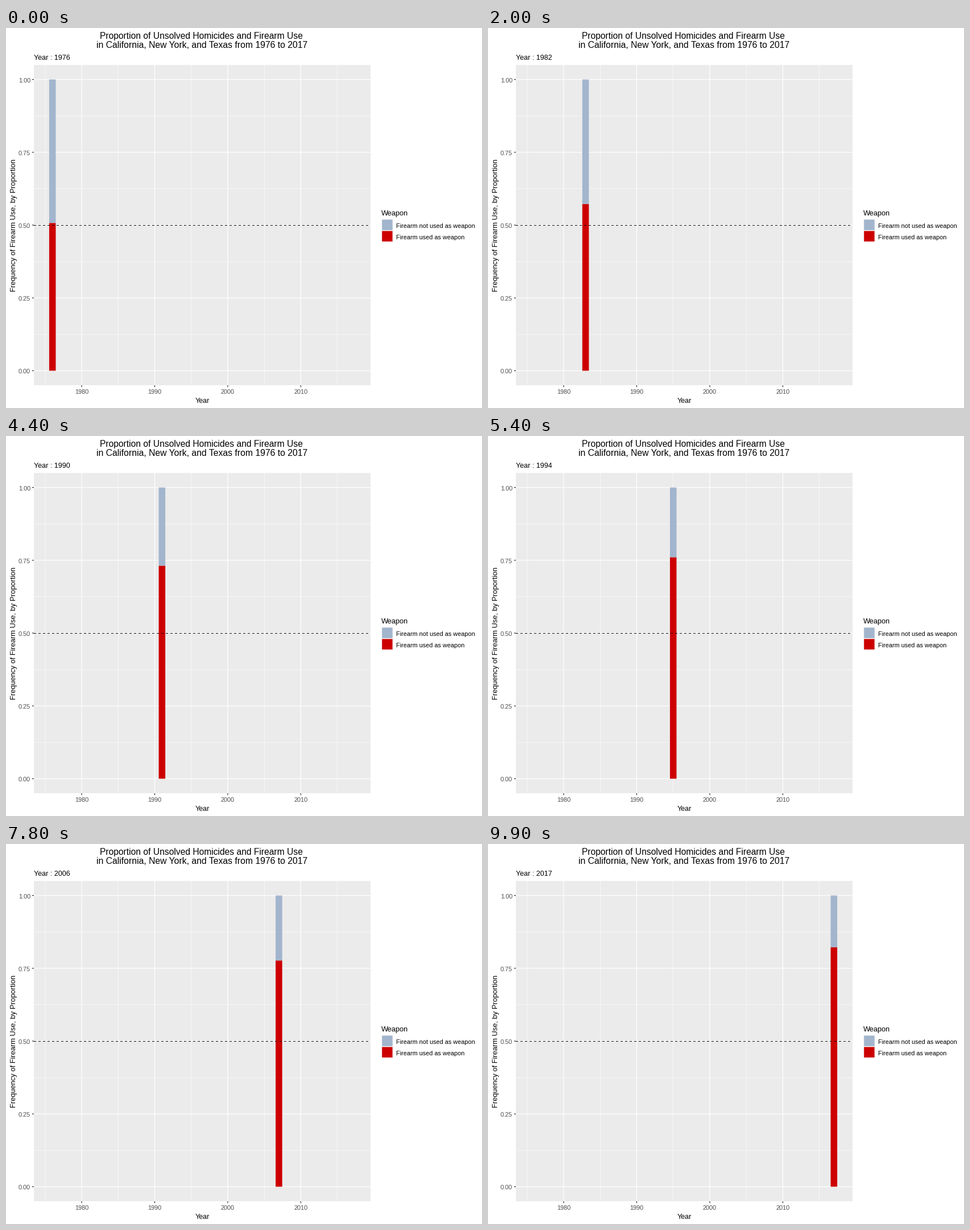
A matplotlib script that plays this animation: 837x669 px, repeating every 10000 ms.

```python
import matplotlib.pyplot as plt
import numpy as np
from matplotlib.animation import FuncAnimation
from matplotlib.patches import Rectangle

W, H, DPI = 837, 669, 64
FRAMES, INTERVAL = 100, 100
FIRST, LAST = 1976, 2017

# Panel edges and data scales in pixels
LEFT, RIGHT, TOP, BOTTOM = 49, 641, 65, 629
YEAR_W = (RIGHT - LEFT) / 46.09
BAR_W = 0.9 * YEAR_W
UNIT_H = (BOTTOM - TOP) / 1.1
ZERO_Y = BOTTOM - 0.05 * UNIT_H
MAJOR, MINOR = 1.23, 0.62  # grid line widths
KEY_SIZE, KEY_INSET = 20, 0.8

BLUE, RED = "#A2B5CD", "#CD0000"
PANEL, KEY, TICK, TICK_TEXT = "#EBEBEB", "#F2F2F2", "#333333", "#4D4D4D"

KNOWN_YEARS = [1976, 1983, 1991, 1995, 2002, 2011, 2017]
KNOWN_SHARES = [0.507, 0.572, 0.731, 0.760, 0.7595, 0.790, 0.822]

plt.rcParams["font.family"] = "Liberation Sans"
fig = plt.figure(figsize=(W / DPI, H / DPI), dpi=DPI, facecolor="white")
ax = fig.add_axes([0, 0, 1, 1])
ax.set_xlim(0, W)
ax.set_ylim(H, 0)
ax.axis("off")


def x_of(year):
    return LEFT + (year - 1975.55 + 2.095) * YEAR_W


def y_of(share):
    return ZERO_Y - share * UNIT_H


def rect(x, y, w, h, color, z=1):
    return ax.add_patch(Rectangle((x, y), w, h, facecolor=color, linewidth=0,
                                  snap=False, zorder=z))


def text(x, y, s, px, color="black", ha="left", **kw):
    return ax.text(x, y, s, fontsize=px * 72 / DPI, color=color, ha=ha,
                   va="baseline", zorder=6, **kw)


def draw_panel():
    rect(LEFT, TOP, RIGHT - LEFT, BOTTOM - TOP, PANEL)
    for i in range(9):
        y = y_of(i / 8)
        width = MINOR if i % 2 else MAJOR
        rect(LEFT, y - width / 2, RIGHT - LEFT, width, "white", 2)
        if i % 2 == 0:
            rect(LEFT - 3.2, y - width / 2, 3.2, width, TICK, 2)
            text(43, round(y) + 5, f"{i / 8:.2f}", 10.9, TICK_TEXT, "right")
    for year in range(1975, 2016, 5):
        x = x_of(year)
        width = MINOR if year % 10 else MAJOR
        rect(x - width / 2, TOP, width, BOTTOM - TOP, "white", 2)
        if year % 10 == 0:
            rect(x - width / 2, BOTTOM, width, 3.2, TICK, 2)
            text(x, 644, str(year), 10.9, TICK_TEXT, "center")
    for x in range(LEFT, RIGHT, 8):
        rect(x, round(y_of(0.5)), 4, 1, "black", 5)


def draw_labels():
    text(343, 19, "Proportion of Unsolved Homicides and Firearm Use", 15.6,
         ha="center")
    text(345, 35, "in California, New York, and Texas from 1976 to 2017", 15.7,
         ha="center")
    text(345, 660, "Year", 12.5, ha="center")
    text(17, 347, "Frequency of Firearm Use, by Proportion", 12.85,
         ha="center", rotation=90, rotation_mode="anchor")


def draw_legend():
    text(660, 330, "Weapon", 12.8)
    entries = [("Firearm not used as weapon", BLUE),
               ("Firearm used as weapon", RED)]
    for i, (label, color) in enumerate(entries):
        x, y = 660.4, 336.6 + i * KEY_SIZE
        inner = KEY_SIZE - 2 * KEY_INSET
        rect(x, y, KEY_SIZE, KEY_SIZE, KEY)
        rect(x + KEY_INSET, y + KEY_INSET, inner, inner, color, 2)
        text(686, 352 + i * KEY_SIZE, label, 10.9)


def year_at(frame):
    """Year reached: one step per three frames at first, then per two."""
    if frame < 50:
        return FIRST + min((frame + 1) // 3, 16)
    return min(1993 + (frame - 50) // 2, LAST)


draw_panel()
draw_labels()
draw_legend()
unused = rect(0, 0, 1, 1, BLUE, 3)
used = rect(0, 0, 1, 1, RED, 4)
subtitle = text(49, 56, "", 12.5)


def update(frame):
    bar_year = year_at(frame)
    label_year = year_at(max(frame - 1, 0))  # the caption lags the bar
    share = np.interp(bar_year, KNOWN_YEARS, KNOWN_SHARES)
    left = x_of(bar_year) - BAR_W / 2
    unused.set_bounds(left, y_of(1), BAR_W, (1 - share) * UNIT_H)
    used.set_bounds(left, y_of(share), BAR_W, share * UNIT_H)
    subtitle.set_text(f"Year : {label_year}")
    return unused, used, subtitle


anim = FuncAnimation(fig, update, frames=FRAMES, interval=INTERVAL,
                     repeat=True, repeat_delay=0)
plt.show()
```
